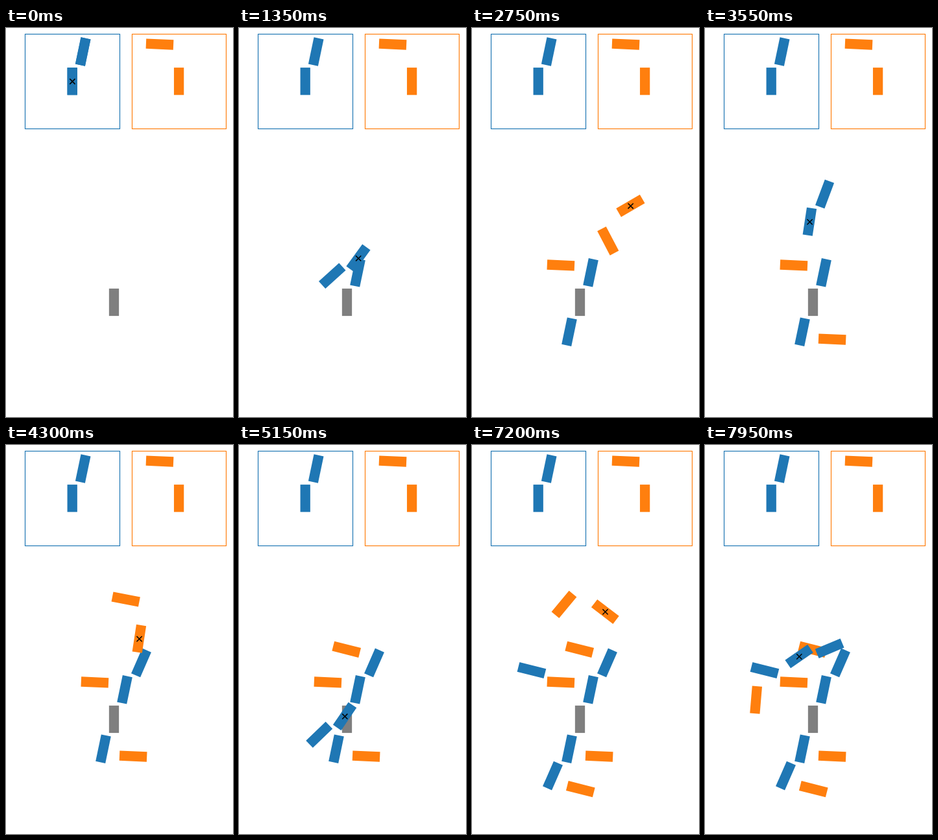
These frames come from a looping animation (350 by 600 pixels, 8 s). An HTML page with a canvas:

```html
<!DOCTYPE html>
<html lang="en">
<head>
<meta charset="utf-8">
<title>Tile assembly</title>
<style>
  html, body { margin: 0; width: 100%; height: 100%; overflow: hidden; background: #fff; }
  canvas { display: block; }
</style>
</head>
<body>
<canvas id="stage" width="350" height="600"></canvas>
<script>
const ctx = document.getElementById('stage').getContext('2d');
const LOOP = 8000, STEP = 50, STEPS_PER_MOVE = 15;
const TILE = { w: 15.3, h: 42.2 };

// Each kind joins a partner tile to a home tile at a fixed offset and turn (degrees).
const blue = { color: '#1f77b4', home: { x: 102.2, y: 82.2 }, dx: 16.5, dy: -45.7, turn: 11.8, box: [29.5, 9.5, 146, 146] };
const orange = { color: '#ff7f0e', home: { x: 266.6, y: 82.2 }, dx: -29.6, dy: -57.1, turn: -87.6, box: [194.5, 9.5, 145, 146] };
const kinds = [blue, orange];

const seed = { x: 166.5, y: 423, angle: 0, color: '#7f7f7f' };

// [kind, index of the tile to attach to, half-turn applied to that tile]
const plan = [
  [blue, 0, 0], [blue, 0, -180], [orange, 0, 0], [orange, 0, -180],
  [blue, 1, 0], [orange, 1, 0], [blue, 2, 0], [orange, 2, 0],
  [blue, 3, 0], [orange, 3, 0], [blue, 4, 0]
];

const rad = deg => deg * Math.PI / 180;
const wrap = deg => deg < -180 ? deg + 360 : deg;
const lerp = (a, b, t) => a + (b - a) * t;

function rotate(x, y, deg) {
  const c = Math.cos(rad(deg)), s = Math.sin(rad(deg));
  return { x: x * c - y * s, y: x * s + y * c };
}

function partner(kind, base, angle) {
  const o = rotate(kind.dx, kind.dy, angle);
  return { x: base.x + o.x, y: base.y + o.y, angle: wrap(angle + kind.turn), color: kind.color };
}

const tiles = [seed];
const moves = plan.map(([kind, index, flip]) => {
  const base = tiles[index];
  const angle = base.angle + flip;
  const from = partner(kind, kind.home, 0);
  const to = partner(kind, base, angle);
  tiles.push(to);
  return { kind, angle, from, to };
});

function drawTile({ x, y, angle, color }) {
  ctx.save();
  ctx.translate(x, y);
  ctx.rotate(rad(angle));
  ctx.fillStyle = color;
  ctx.fillRect(-TILE.w / 2, -TILE.h / 2, TILE.w, TILE.h);
  ctx.restore();
}

function drawCross(x, y) {
  const r = 4.1;
  ctx.strokeStyle = '#000';
  ctx.lineWidth = 1.5;
  ctx.beginPath();
  ctx.moveTo(x - r, y - r);
  ctx.lineTo(x + r, y + r);
  ctx.moveTo(x - r, y + r);
  ctx.lineTo(x + r, y - r);
  ctx.stroke();
}

function drawTemplate(kind) {
  ctx.strokeStyle = kind.color;
  ctx.lineWidth = 1.2;
  ctx.strokeRect(...kind.box);
  drawTile({ ...kind.home, angle: 0, color: kind.color });
  drawTile(partner(kind, kind.home, 0));
}

// The partner travels in a straight line while the home tile swings around it.
function drawMove({ kind, angle, from, to }, t) {
  const turn = angle * t;
  const x = lerp(from.x, to.x, t), y = lerp(from.y, to.y, t);
  const arm = rotate(-kind.dx, -kind.dy, turn);
  const home = { x: x + arm.x, y: y + arm.y, angle: turn, color: kind.color };
  drawTile(home);
  drawTile({ x, y, angle: turn + kind.turn, color: kind.color });
  drawCross(home.x + 0.2, home.y + 0.3);
}

function draw(time) {
  const step = Math.floor((time % LOOP) / STEP);
  const current = Math.floor(step / STEPS_PER_MOVE);
  ctx.fillStyle = '#fff';
  ctx.fillRect(0, 0, 350, 600);
  kinds.forEach(drawTemplate);
  tiles.slice(0, current + 1).forEach(drawTile);
  drawMove(moves[current], (step % STEPS_PER_MOVE) / STEPS_PER_MOVE);
}

const start = performance.now();
function tick() {
  draw(performance.now() - start);
  requestAnimationFrame(tick);
}
tick();
</script>
</body>
</html>
```
